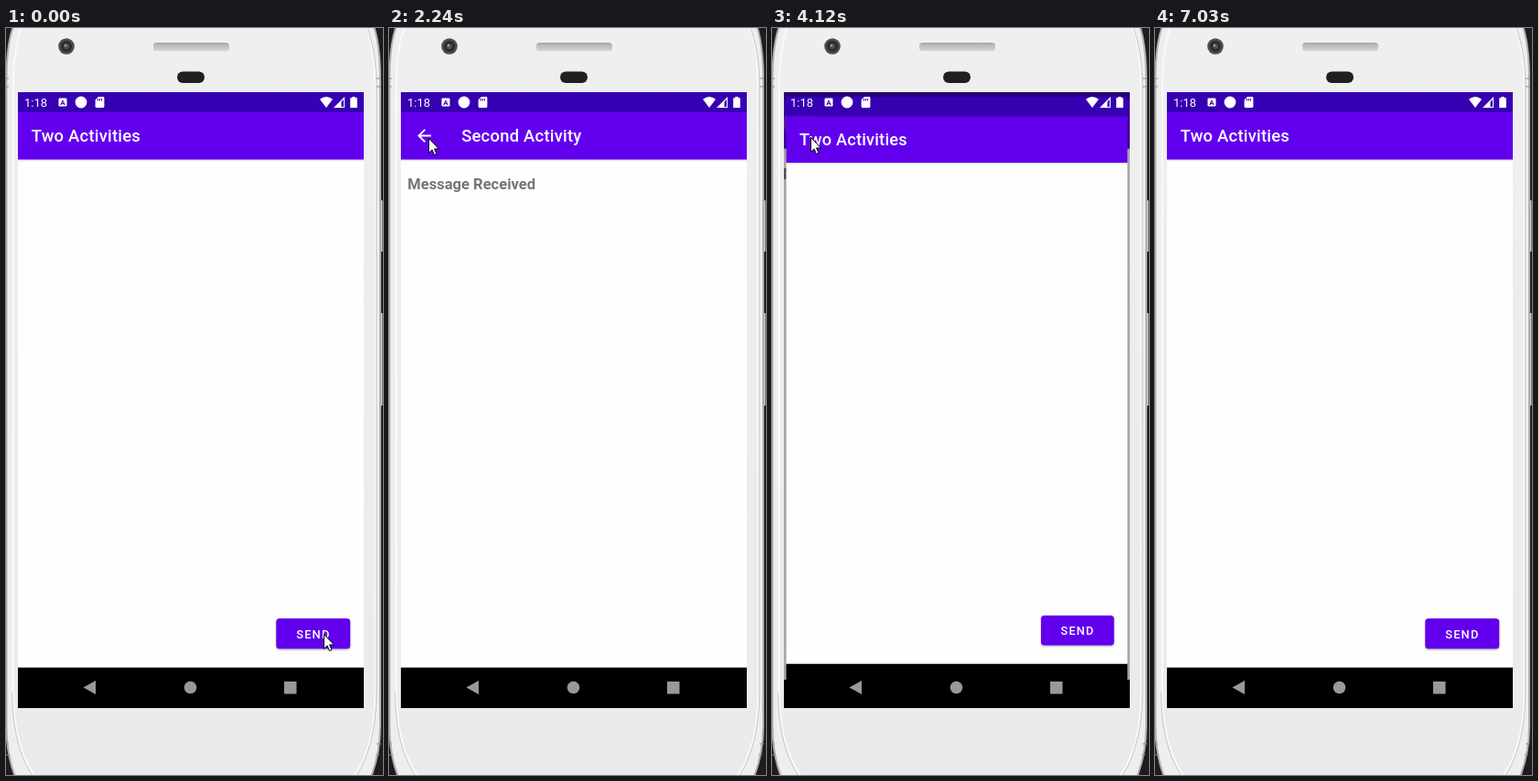
These frames come from a looping animation (412x815 px, 7440 ms). An HTML page:

```html
<!DOCTYPE html>
<html lang="en">
<head>
<meta charset="utf-8">
<title>Two Activities</title>
<style>
  html, body { margin: 0; width: 100%; height: 100%; overflow: hidden; background: #1d1d1f; }
  svg { display: block; width: 412px; height: 815px; }
  text { font-family: Roboto, sans-serif; fill: #fff; white-space: pre; }
  .title { font-size: 18.4px; font-weight: 500; letter-spacing: .0125em; }
  .message { font-size: 16.55px; font-weight: 700; fill: #757575; }
  .label { font-size: 12.9px; font-weight: 500; letter-spacing: .0893em; }
  .button { fill: #6200ee; filter: drop-shadow(0 1px 1px #0005); }
  .pressed .button { fill: #7c2cf1; filter: drop-shadow(0 3px 2.5px #0007); }
</style>
</head>
<body>
<svg viewBox="0 0 412 815">
  <defs>
    <linearGradient id="shell" x2="0" y2="1">
      <stop offset="0" stop-color="#efeff0"/>
      <stop offset="1" stop-color="#e8eaeb"/>
    </linearGradient>
    <linearGradient id="slot" x2="0" y2="1">
      <stop offset="0" stop-color="#a2a2a8"/>
      <stop offset=".35" stop-color="#bcbcc1"/>
      <stop offset="1" stop-color="#d2d2d6"/>
    </linearGradient>
    <linearGradient id="shade" x2="0" y2="1">
      <stop offset="0" stop-color="#000" stop-opacity=".16"/>
      <stop offset="1" stop-color="#000" stop-opacity="0"/>
    </linearGradient>
    <clipPath id="screen"><path d="M13 70H391V742H13Z"/></clipPath>
    <g id="page">
      <path fill="#fefefe" d="M13 143H391V698H13Z"/>
      <path fill="url(#shade)" d="M13 143H391V146H13Z"/>
      <path fill="#6200ee" d="M13 92H391V143.4H13Z"/>
      <path fill="#3700b3" d="M13 70H391V92H13Z"/>
      <path d="M13 697.7H391V742H13Z"/>
    </g>
  </defs>

  <!-- phone body -->
  <path fill="#1d1d1f" d="M0 0H412V815H0Z"/>
  <path fill="#cfcacc" d="M408 188H411.500V244H408ZM408 311H411.500V412H408Z"/>
  <path fill="#efeeef" stroke="#b3adb0" stroke-width="2"
    d="M8 -2C3 12 .5 30 .5 56V762C.5 784 4 801 10 817H399C405 801 409 784 409 762V56C409 30 406.500 12 402 -2Z"/>
  <path fill="url(#shell)" stroke="#fafafa" stroke-width="2"
    d="M17 -2C10 18 8 38 8 62V725C8 765 17 796 32 817H380C395 796 403.500 765 403.500 725V62C403.500 38 401 18 394 -2Z"/>
  <path fill="none" stroke="#c6c4c7"
    d="M394.500 -2C401.500 18 404.800 38 404.800 62V725C404.800 765 396 796 382 817M6.800 725C6.800 765 15 796 30 817"/>
  <path stroke="#8e8a8d" d="M0 55H3M0 64H3M405 55H410M405 64H410M0 781H3M0 793H4M405 781H410M404 793H408"/>
  <circle cx="66" cy="20" r="8.800" fill="#4b4c50"/>
  <circle cx="66" cy="20" r="6" fill="#2a2b2f"/>
  <circle cx="66" cy="20" r="3" fill="#4e565d"/>
  <circle cx="65" cy="19" r="1.200" fill="#98a3a8"/>
  <rect x="161" y="16" width="83" height="9" rx="3.500" fill="url(#slot)"/>
  <rect x="187" y="47.500" width="30" height="12.500" rx="6.200" fill="#1f1f24"/>

  <g clip-path="url(#screen)">
    <path d="M13 70H391V742H13Z"/>
    <g id="pages">
      <g id="second">
        <use href="#page"/>
        <circle id="ripple" cx="39" cy="117.500" r="18" fill="#fff" opacity=".2"/>
        <path fill="#fff" transform="translate(27.6 106.5) scale(.92)"
          d="M20 11H7.83l5.59-5.59L12 4l-8 8 8 8 1.41-1.41L7.83 13H20z"/>
        <text class="title" x="79.200" y="124.200">Second Activity</text>
        <text class="message" x="20.300" y="175.700">Message Received</text>
      </g>
      <g id="main">
        <use href="#page"/>
        <text class="title" x="27.700" y="124.200">Two Activities</text>
        <rect class="button" x="295.300" y="644.300" width="80.900" height="33" rx="3.600"/>
        <text class="label" x="317.200" y="665.500">SEND</text>
      </g>
    </g>

    <!-- status bar -->
    <text x="20" y="85.800" font-size="13">1:18</text>
    <g fill="#fff">
      <rect x="57.500" y="76.500" width="9" height="9" rx="1.200"/>
      <text x="62" y="84" font-size="8" font-weight="700" text-anchor="middle" style="fill:#3700b3">A</text>
      <circle cx="82" cy="81" r="6.400"/>
      <path d="M101 75H106Q107.400 75 107.400 76.400V85.600Q107.400 87 106 87H99Q97.600 87 97.600 85.600V78.400Z"/>
      <path d="M350 87L343 77.800Q350 72.400 357 77.800Z"/>
      <path d="M358 87L370 75V87ZM366.500 80.500V86H369V78Z" fill-rule="evenodd"/>
      <path d="M378.300 75H381.700V76.300H383.800V87H376.200V76.300H378.300Z"/>
    </g>
    <path stroke="#3700b3" d="M100.500 77V79.500M102.500 77V79.500M104.500 77V79.500"/>

    <!-- navigation bar -->
    <g fill="#999">
      <path d="M84.500 719.500L98 712V727Z"/>
      <circle cx="201.500" cy="719.500" r="6.800"/>
      <rect x="304" y="713" width="13.500" height="13.500"/>
    </g>
  </g>

  <path id="cursor" fill="#fff" stroke="#000" d="M.5 .5V16.200L4.100 12.900 6.500 18.500 9 17.400 6.600 11.900H11.500Z"/>
</svg>

<script>
const LOOP = 7440, OPEN_MS = 400;
// the screen is sampled at an even, coarse rate; moments below count samples
const SAMPLE_MS = 132.4, LEAD_MS = 37;
const PRESS = 11, OPEN_SECOND = 11.72;
const BACK_PRESS = 29, OPEN_MAIN = 29.82;
const CURSOR_GONE = 53;

// turning points of the cursor: sample, x, y
const route = [
  [0, 347, 661], [8, 347, 660], [15, 347, 660], [16, 290, 708],
  [17, 43, 120], [18, 43, 120], [19, 48, 124], [22, 42, 119],
  [33, 42, 119], [35, 152, 136], [36, 278, 217], [38, 353, 556],
  [39, 186, 489], [44, 325, 659], [50, 325, 659], [52, 366, 792]
];

const byId = id => document.getElementById(id);
const [pages, main, second, ripple, cursor] =
  ['pages', 'main', 'second', 'ripple', 'cursor'].map(byId);
const clamp = v => Math.max(0, Math.min(1, v));

const bezier = (a, b, c, d, u) => {
  const v = 1 - u;
  return a * v * v * v + 3 * b * u * v * v + 3 * c * u * u * v + d * u * u * u;
};

// fast start, very slow finish: two joined cubic pieces
function ease(x) {
  const [xs, ys] = x < 1 / 6
    ? [[0, .05, .1333, 1 / 6], [0, 0, .06, .4]]
    : [[1 / 6, .2083, .25, 1], [.4, .82, 1, 1]];
  let lo = 0, hi = 1;
  for (let i = 0; i < 24; i++) {
    const mid = (lo + hi) / 2;
    if (bezier(...xs, mid) < x) lo = mid; else hi = mid;
  }
  return bezier(...ys, lo);
}

function place(page, scale, opacity) {
  page.setAttribute('transform', `translate(202 406) scale(${scale}) translate(-202 -406)`);
  page.setAttribute('opacity', opacity);
}

function showPages(front, back, age) {
  const p = ease(clamp(age / OPEN_MS));
  if (pages.lastElementChild !== front) pages.append(front);
  place(front, .85 + .15 * p, clamp((age - 35) / 50));
  place(back, 1 + .05 * p, age < OPEN_MS ? 1 - .38 * p : 0);
}

function moveCursor(n) {
  cursor.style.display = n < CURSOR_GONE ? '' : 'none';
  const next = route.findIndex(key => key[0] > n);
  const [end, x1, y1] = route.at(next);
  const [begin, x0, y0] = route.at(next < 0 ? -1 : next - 1);
  const p = next < 0 ? 1 : (n - begin) / (end - begin);
  const x = Math.ceil(x0 + (x1 - x0) * p), y = Math.ceil(y0 + (y1 - y0) * p);
  cursor.setAttribute('transform', `translate(${x} ${y})`);
}

function render(time) {
  const n = Math.floor((time + LEAD_MS) / SAMPLE_MS);
  if (n < OPEN_SECOND) showPages(main, second, OPEN_MS);
  else if (n < OPEN_MAIN) showPages(second, main, (n - OPEN_SECOND) * SAMPLE_MS);
  else showPages(main, second, (n - OPEN_MAIN) * SAMPLE_MS);

  main.classList.toggle('pressed', n >= PRESS && n < OPEN_MAIN);
  ripple.style.display = n >= BACK_PRESS ? '' : 'none';
  moveCursor(n);
}

const start = performance.now();
function tick() {
  render((performance.now() - start) % LOOP);
  requestAnimationFrame(tick);
}
tick();
</script>
</body>
</html>
```
